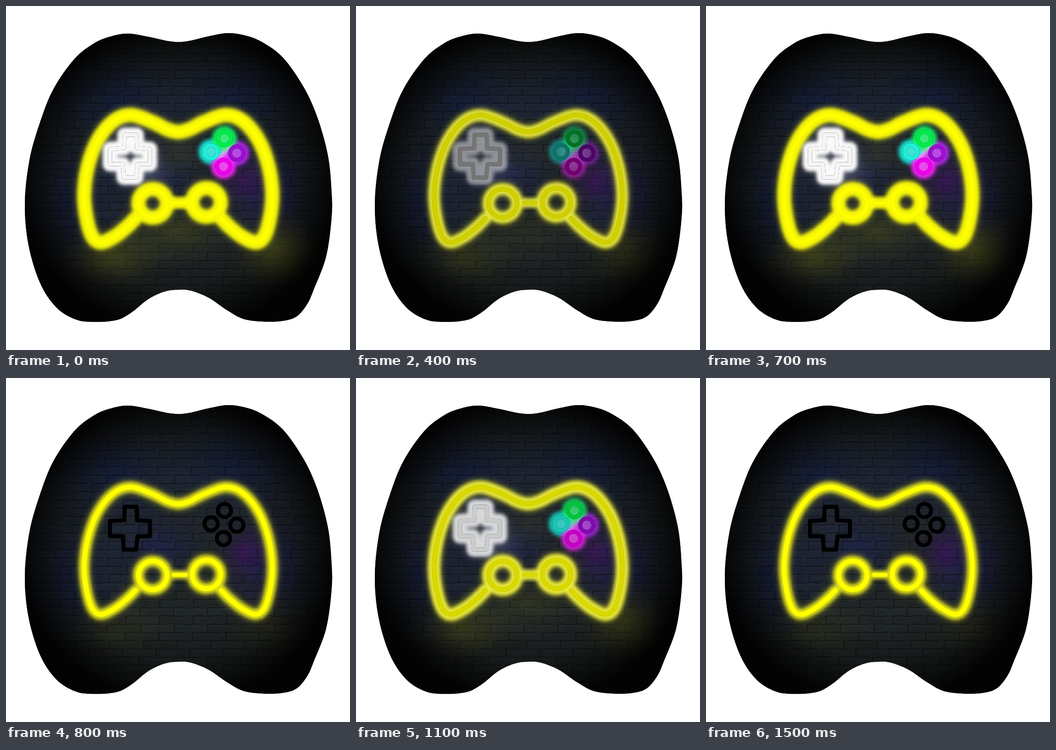
Write an HTML page with a canvas that moves like this. It is 748 px wide and 748 px high and loops after 1.6 s.

```html
<!DOCTYPE html>
<html lang="en">
<head>
<meta charset="utf-8">
<title>Neon gamepad</title>
<style>
  html, body { margin: 0; width: 100%; height: 100%; overflow: hidden; background: #fff; }
  canvas { display: block; width: 100vw; height: 100vh; }
</style>
</head>
<body>
<canvas id="stage" width="748" height="748"></canvas>
<script>
const SIZE = 748, STEP = 100;
const ctx = document.getElementById('stage').getContext('2d');

// Smooth curve through points given as x, y pairs.
function smooth(flat, closed) {
  const pts = [];
  for (let i = 0; i < flat.length; i += 2) pts.push([flat[i], flat[i + 1]]);
  const n = pts.length;
  const at = i => closed ? pts[(i + n) % n] : pts[Math.max(0, Math.min(n - 1, i))];
  const path = new Path2D();
  path.moveTo(...pts[0]);
  for (let i = 0; i < (closed ? n : n - 1); i++) {
    const [a, b, c, d] = [at(i - 1), at(i), at(i + 1), at(i + 2)];
    path.bezierCurveTo(b[0] + (c[0] - a[0]) / 6, b[1] + (c[1] - a[1]) / 6,
      c[0] - (d[0] - b[0]) / 6, c[1] - (d[1] - b[1]) / 6, c[0], c[1]);
  }
  if (closed) path.closePath();
  return path;
}

function ring(x, y, r) {
  const path = new Path2D();
  path.arc(x, y, r, 0, Math.PI * 2);
  return path;
}

const board = smooth([
  190, 82, 148, 116, 103, 181, 74, 253, 51, 335, 41, 430, 49, 520, 74, 602, 109, 655,
  150, 681, 190, 687, 240, 683, 272, 667, 310, 637, 345, 621, 375, 617, 402, 619,
  440, 634, 480, 661, 515, 680, 555, 686, 600, 685, 632, 675, 655, 648, 669, 617,
  696, 545, 708, 460, 708, 405, 700, 325, 677, 242, 647, 176, 602, 112, 556, 78,
  520, 64, 482, 59, 440, 66, 392, 77, 358, 77, 310, 67, 265, 60, 225, 67], true);

const half = [281, 462, 262, 481, 235, 502, 206, 514, 187, 500, 174, 455, 170, 405,
  179, 345, 200, 291, 234, 250, 272, 237, 320, 253, 350, 268];
const mirrored = [];
for (let i = half.length - 2; i >= 0; i -= 2) mirrored.push(749 - half[i], half[i + 1]);

const body = smooth([...half, 374.5, 274, ...mirrored], false);
body.addPath(ring(319, 429, 31));
body.addPath(ring(436, 427, 31));
const link = new Path2D('M365 428H391');
const pad = new Path2D('M258 280H284L285 309 313 311V344H286L283 373H256L254 344H226V311L257 309Z');
const buttons = [
  { x: 446, y: 317, glow: '#18f2e2', tube: '#20efd8' },
  { x: 502, y: 320, glow: '#b82af0', tube: '#9c0fd0' },
  { x: 475, y: 288, glow: '#14fa64', tube: '#00ed4c' },
  { x: 473, y: 349, glow: '#fa28fa', tube: '#f000ee' }
];

function stroke(c, path, color, width, blur = 0, alpha = 1) {
  c.save();
  c.filter = blur ? `blur(${blur}px)` : 'none';
  c.globalAlpha = alpha;
  c.lineCap = c.lineJoin = 'round';
  c.lineWidth = width;
  c.strokeStyle = color;
  c.stroke(path);
  c.restore();
}

function spot(c, x, y, rx, ry, rgb, alpha) {
  c.save();
  c.translate(x, y);
  c.scale(rx, ry);
  const g = c.createRadialGradient(0, 0, 0, 0, 0, 1);
  for (let i = 0; i <= 4; i++) {
    g.addColorStop(i / 4, `rgba(${rgb},${alpha * (1 - i / 4) ** 1.5})`);
  }
  c.fillStyle = g;
  c.fillRect(-1, -1, 2, 2);
  c.restore();
}

function drawBricks(c) {
  let seed = 7;
  const rnd = () => (seed = seed * 16807 % 2147483647) / 2147483647;
  const wobble = (x1, x2, y, color, width) => {
    const line = new Path2D();
    line.moveTo(x1, y + rnd() * 2);
    for (let x = x1 + 9; x < x2; x += 9) line.lineTo(x, y + rnd() * 2.4 - 0.7);
    stroke(c, line, color, width);
  };
  for (let row = 0; row < 36; row++) {
    const y = 49 + row * 18;
    const shift = row % 2 * 36 + rnd() * 12;
    for (let x = shift - 40; x < SIZE; x += 73) {
      c.fillStyle = `rgba(170,190,200,${rnd() * 0.025})`;
      c.fillRect(x, y, 71, 16);
      wobble(x, x + 71, y, 'rgba(0,0,0,.45)', 1.6);
      wobble(x + 2, x + 69, y + 3, 'rgba(170,185,195,.045)', 1);
      stroke(c, new Path2D(`M${x} ${y}l${rnd() * 2} 17`), 'rgba(0,0,0,.4)', 1.6);
      for (let i = 0; i < 3; i++) {
        const cx = x + 5 + rnd() * 45, cy = y + 5 + rnd() * 9;
        wobble(cx, cx + 8 + rnd() * 18, cy, 'rgba(0,0,0,.22)', 1);
      }
    }
  }
}

function makeWall() {
  const canvas = document.createElement('canvas');
  canvas.width = canvas.height = SIZE;
  const c = canvas.getContext('2d');
  c.save();
  c.clip(board);
  c.fillStyle = '#1e2324';
  c.fillRect(0, 0, SIZE, SIZE);
  spot(c, 240, 210, 200, 140, '20,32,76', 0.75);
  spot(c, 500, 200, 200, 140, '20,32,76', 0.75);
  spot(c, 330, 370, 150, 110, '26,32,82', 0.65);
  spot(c, 155, 430, 140, 200, '20,30,76', 0.7);
  spot(c, 575, 410, 130, 170, '26,28,84', 0.75);
  spot(c, 230, 550, 140, 80, '72,76,30', 0.45);
  spot(c, 580, 545, 120, 90, '72,76,30', 0.45);
  drawBricks(c);
  spot(c, 520, 380, 70, 70, '75,14,110', 0.5);
  c.translate(374, 375);
  c.scale(345, 330);
  const shade = c.createRadialGradient(0, 0, 0.48, 0, 0, 1);
  shade.addColorStop(0, 'rgba(0,0,0,0)');
  shade.addColorStop(0.5, 'rgba(0,0,0,.32)');
  shade.addColorStop(1, 'rgba(0,0,0,.92)');
  c.fillStyle = shade;
  c.fillRect(-2, -2, 4, 4);
  c.restore();
  return canvas;
}

// halo and tube light the buttons; level, spread, tint and wash belong to the yellow outline.
const poses = [
  { halo: 1, tube: 1, level: 255, spread: 31, tint: '#ffff08', wash: 1 },
  { halo: 0.91, tube: 0.92, level: 237, spread: 29, tint: '#f6f628', wash: 0.85 },
  { halo: 0.81, tube: 0.83, level: 217, spread: 28, tint: '#ecec40', wash: 0.7 },
  { halo: 0.65, tube: 0.66, level: 212, spread: 27, tint: '#eaea40', wash: 0.55 },
  { halo: 0.47, tube: 0.48, level: 208, spread: 26, tint: '#e8e840', wash: 0.4 },
  { halo: 0.24, tube: 0.24, level: 204, spread: 25, tint: '#e6e640', wash: 0.2 },
  { halo: 0, tube: 0, level: 255, spread: 23, tint: '#e4e41c', wash: 0 }
];
const sequence = [0, 1, 2, 3, 4, 5, 6, 0, 6, 0, 1, 2, 3, 4, 5, 6];

function drawOutline(c, p) {
  const yellow = `rgb(${p.level},${p.level},0)`;
  const edge = `rgb(${p.level * 0.93},${p.level * 0.93},0)`;
  stroke(c, body, '#d8d820', p.spread + 5, 7, 0.45);
  stroke(c, body, p.tint, p.spread - 1, 3.5, 0.95);
  stroke(c, link, p.tint, p.spread - 5, 3.5, 0.95);
  for (const [path, width] of [[body, 11], [link, 9]]) {
    stroke(c, path, edge, width);
    stroke(c, path, yellow, width - 1.5);
  }
}

function drawPad(c, p) {
  stroke(c, pad, '#fff', 38, 7, p.halo * 0.2);
  stroke(c, pad, '#fff', 31, 3.5, p.halo * 0.97);
  stroke(c, pad, '#000', 9);
  stroke(c, pad, '#f5f5f5', 9, 0, p.tube);
}

function drawButtons(c, p) {
  spot(c, 474, 318, 36, 36, '255,255,255', p.halo * 0.7);
  for (const b of buttons) {
    c.save();
    c.globalAlpha = p.halo * 0.95;
    c.filter = 'blur(4px)';
    c.fillStyle = b.glow;
    c.fill(ring(b.x, b.y, 27));
    c.restore();
  }
  stroke(c, new Path2D('M462 331L487 306'), '#fff', 6, 4, p.halo ** 3 * 0.7);
  for (const b of buttons) {
    const path = ring(b.x, b.y, 14.5);
    stroke(c, path, '#000', 8.5);
    stroke(c, path, b.tube, 8.5, 0, p.tube);
    c.save();
    c.globalAlpha = p.halo * 0.2;
    c.fillStyle = '#d8d8d8';
    c.fill(ring(b.x, b.y, 10));
    c.restore();
  }
}

const wall = makeWall();

function render(p) {
  const c = ctx;
  c.fillStyle = '#fff';
  c.fillRect(0, 0, SIZE, SIZE);
  c.drawImage(wall, 0, 0);
  c.save();
  c.clip(board);
  spot(c, 235, 540, 120, 75, '90,92,24', 0.4 * p.wash);
  spot(c, 370, 490, 140, 75, '90,92,24', 0.4 * p.wash);
  spot(c, 585, 525, 95, 90, '90,92,24', 0.45 * p.wash);
  spot(c, 375, 320, 90, 70, '90,92,40', 0.25 * p.wash);
  spot(c, 310, 360, 70, 60, '190,190,200', 0.2 * p.halo);
  c.restore();
  drawOutline(c, p);
  drawPad(c, p);
  drawButtons(c, p);
}

let shown = -1;
function tick() {
  const pose = sequence[Math.floor(performance.now() / STEP) % sequence.length];
  if (pose !== shown) render(poses[shown = pose]);
  requestAnimationFrame(tick);
}
tick();
</script>
</body>
</html>
```
